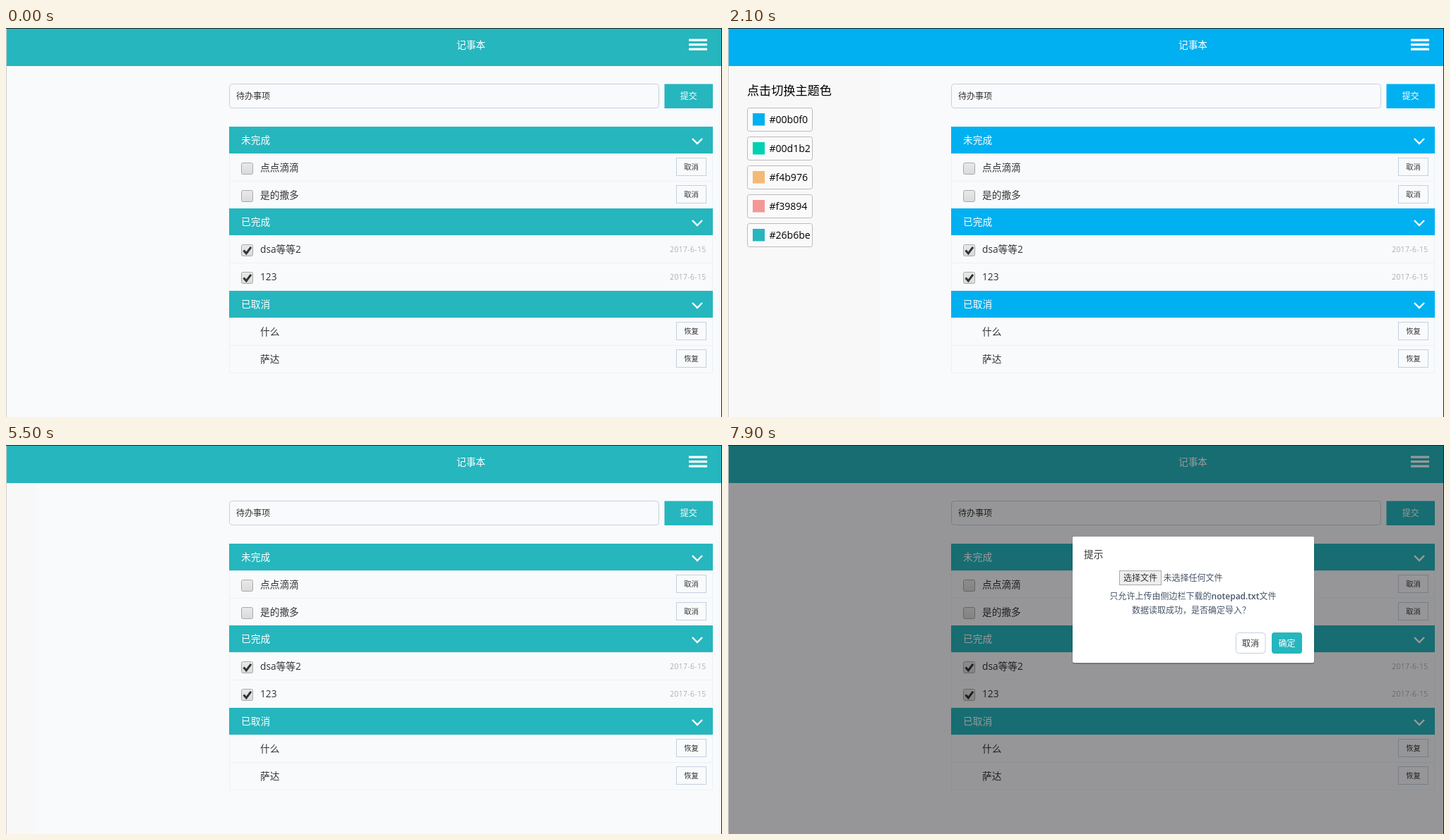
An HTML page for the animation above (8000 ms loop, 1014x552 px).

```html
<!DOCTYPE html>
<html lang="zh-CN">
<head>
<meta charset="utf-8">
<title>记事本</title>
<style>
html, body { margin: 0; width: 100%; height: 100%; overflow: hidden; background: #f9fafc; }
svg { display: block; width: 1014px; height: 552px; --c: #26b6be; }
text { font: 300 13.7px "Open Sans", "Noto Sans CJK SC", "Noto Sans CJK", sans-serif; fill: #333; }
.theme { fill: var(--c); }
.white { fill: #fff; }
.mid { text-anchor: middle; }
.s12 { font-size: 12px; }
.s10 { font-size: 10.3px; }
.reg { font-weight: 400; }
.dim { fill: #475669; }
.date { fill: #888; font-size: 10.3px; letter-spacing: .4px; text-anchor: end; }
.box { fill: none; stroke: #c5d1de; }
.rule { fill: none; stroke: #eef1f5; }
.tick { fill: none; stroke: #333; stroke-width: 3; }
.chevron { fill: none; stroke: #fff; stroke-width: 2.4; }
</style>
</head>
<body>
<svg id="stage" viewBox="0 0 1014 552"></svg>
<script>
const stage = document.getElementById('stage');
const rect = (x, y, w, h, attrs) => `<rect x="${x}" y="${y}" width="${w}" height="${h}" ${attrs}/>`;
const text = (x, y, str, cls = '') => `<text x="${x}" y="${y}" class="${cls}">${str}</text>`;
const path = (d, cls) => `<path d="${d}" class="${cls}"/>`;
const themed = 'class="theme"';

const groups = [
  { top: 140, name: '未完成', rows: ['点点滴滴', '是的撒多'], action: '取消', check: true },
  { top: 256, name: '已完成', rows: ['dsa等等2', '123'], check: true, done: true },
  { top: 373, name: '已取消', rows: ['什么', '萨达'], action: '恢复' }
];
const menu = ['切换主题', '下载数据', '导入数据', '编辑数据', '清空数据'];
const colors = ['#00b0f0', '#00d1b2', '#f4b976', '#f39894', '#26b6be'];

function row(group, label, i) {
  const y = group.top + 38 + 39 * i;
  let out = rect(316.5, y + .5, 684, 39, 'class="rule"') + text(360, y + 25, label, group.done ? 'reg' : '');
  if (group.check) out += rect(333.5, y + 13.5, 16, 16, 'rx="2" fill="url(#shade)" stroke="#aaa"');
  if (group.done) {
    out += path(`M336.5 ${y + 21.5}l3.8 4.3l6.7 -9`, 'tick') + text(991.5, y + 24, '2017-6-15', 'date');
  } else {
    out += rect(949.5, y + 6.5, 42, 25, 'class="box"') + text(970.5, y + 23, group.action, 's10 mid');
  }
  return out;
}

const groupView = g => g.rows.map((label, i) => row(g, label, i)).join('') +
  rect(316, g.top, 685, 38, themed) +
  text(333, g.top + 24, g.name, 'white') +
  path(`M972 ${g.top + 17}l7 7l7 -7`, 'chevron');

const page =
  rect(0, 0, 1014, 552, 'fill="#f9fafc"') +
  rect(1, 1, 1012, 53, themed) +
  text(658.5, 29, '记事本', 'white mid') +
  [15.5, 22, 28.5].map(y => rect(967, y, 26, 3.2, 'fill="#fff"')).join('') +
  rect(316.5, 79.5, 608, 34, 'rx="4" class="box"') +
  text(326, 100.5, '待办事项', 's12') +
  rect(932.5, 79.5, 68.5, 34.5, themed) +
  text(966.7, 101, '提交', 's12 white mid') +
  groups.map(groupView).join('');

const menuPanel = rect(1, 54, 215, 498, 'fill="#808080"') +
  menu.map((label, i) => {
    const y = 89.5 + 51.4 * i;
    return rect(65.5, y, 86, 34.5, themed) + text(108.3, y + 21.5, label, 's12 white mid');
  }).join('');

const colorPanel = rect(1, 54, 215, 498, 'fill="#f8f8f8"') +
  `<text x="27" y="95" style="font-size:17.14px;font-weight:400;fill:#000">点击切换主题色</text>` +
  colors.map((color, i) => {
    const y = 113.5 + 41 * i;
    return rect(27.5, y, 92, 33, 'rx="3" fill="#fafafa" stroke="#bbb"') +
      rect(35, y + 7.5, 17, 17.5, `fill="${color}"`) +
      `<text x="58.5" y="${y + 21.5}" style="font-size:14px;font-weight:400;fill:#000">${color}</text>`;
  }).join('');

const dialog =
  rect(487.5, 131, 343, 180, 'rx="3" fill="#000" opacity=".2"') +
  rect(488, 130, 342, 179, 'rx="2" fill="#fff"') +
  text(504, 160, '提示', 'reg') +
  rect(554.5, 178.5, 59, 20, 'fill="#eee" stroke="#aaa"') +
  text(584, 193, '选择文件', 's12 mid reg') +
  text(616.5, 193, '未选择任何文件', 's12 dim') +
  text(658.5, 218.5, '只允许上传由侧边栏下载的<tspan font-weight="600">notepad.txt</tspan>文件', 's12 dim mid') +
  text(572, 238.5, '数据读取成功，是否确定导入？', 's12 dim') +
  rect(719.5, 266.5, 41.5, 29, 'rx="4" class="box"') +
  text(740, 285.5, '取消', 's12 mid reg') +
  rect(770, 266, 43, 30, 'rx="4" class="theme"') +
  text(791.5, 285.5, '确定', 's12 white mid');

stage.innerHTML = `
  <defs>
    <linearGradient id="shade" x2="0" y2="1"><stop stop-color="#e9e9e9"/><stop offset="1" stop-color="#dadada"/></linearGradient>
    <clipPath id="side">${rect(1, 54, 215, 498, '')}</clipPath>
  </defs>
  ${page}
  <g clip-path="url(#side)"><g id="menu">${menuPanel}</g><g id="colors">${colorPanel}</g></g>
  ${rect(1, 1, 1012, 551, 'id="shadeAll"')}
  <g id="dialog">${dialog}</g>
  ${rect(0, 0, 1, 552, 'fill="#ccc"')}
  ${rect(0, 0, 1014, 1, 'fill="#222"')}
  ${rect(1013, 0, 1, 552, 'fill="#222"')}`;

const el = id => document.getElementById(id);
const parts = { menu: el('menu'), colors: el('colors'), shade: el('shadeAll'), dialog: el('dialog') };

// The CSS "ease" curve, solved by bisection.
function ease(x) {
  if (x <= 0) return 0;
  if (x >= 1) return 1;
  let lo = 0, hi = 1, s;
  for (let i = 0; i < 20; i++) {
    s = (lo + hi) / 2;
    if (.75 * s * (1 - s) + s ** 3 < x) lo = s; else hi = s;
  }
  return .3 * s * (1 - s) ** 2 + 3 * s * s * (1 - s) + s ** 3;
}

const themes = [[0, 4], [2100, 0], [2600, 1], [3200, 2], [3800, 3], [4300, 4]];

function draw() {
  // The picture advances in steps of 100 ms.
  const t = Math.floor(performance.now() % 8000 / 100) * 100;
  const go = start => t < start ? 0 : ease((t - start + 50) / 300);
  const slide = (part, shown) => part.setAttribute('transform', `translate(${(shown - 1) * 216} 0)`);

  const theme = themes.filter(([start]) => start <= t).pop()[1];
  stage.style.setProperty('--c', colors[theme]);
  slide(parts.menu, go(600) - go(1400) + go(5900) - go(7400));
  slide(parts.colors, go(1500) - go(5400));

  const open = go(7600);
  parts.shade.setAttribute('opacity', .4 * open);
  parts.dialog.setAttribute('opacity', open);
  parts.dialog.setAttribute('transform', `translate(0 ${-20 * (1 - open)})`);
  requestAnimationFrame(draw);
}
draw();
</script>
</body>
</html>
```
